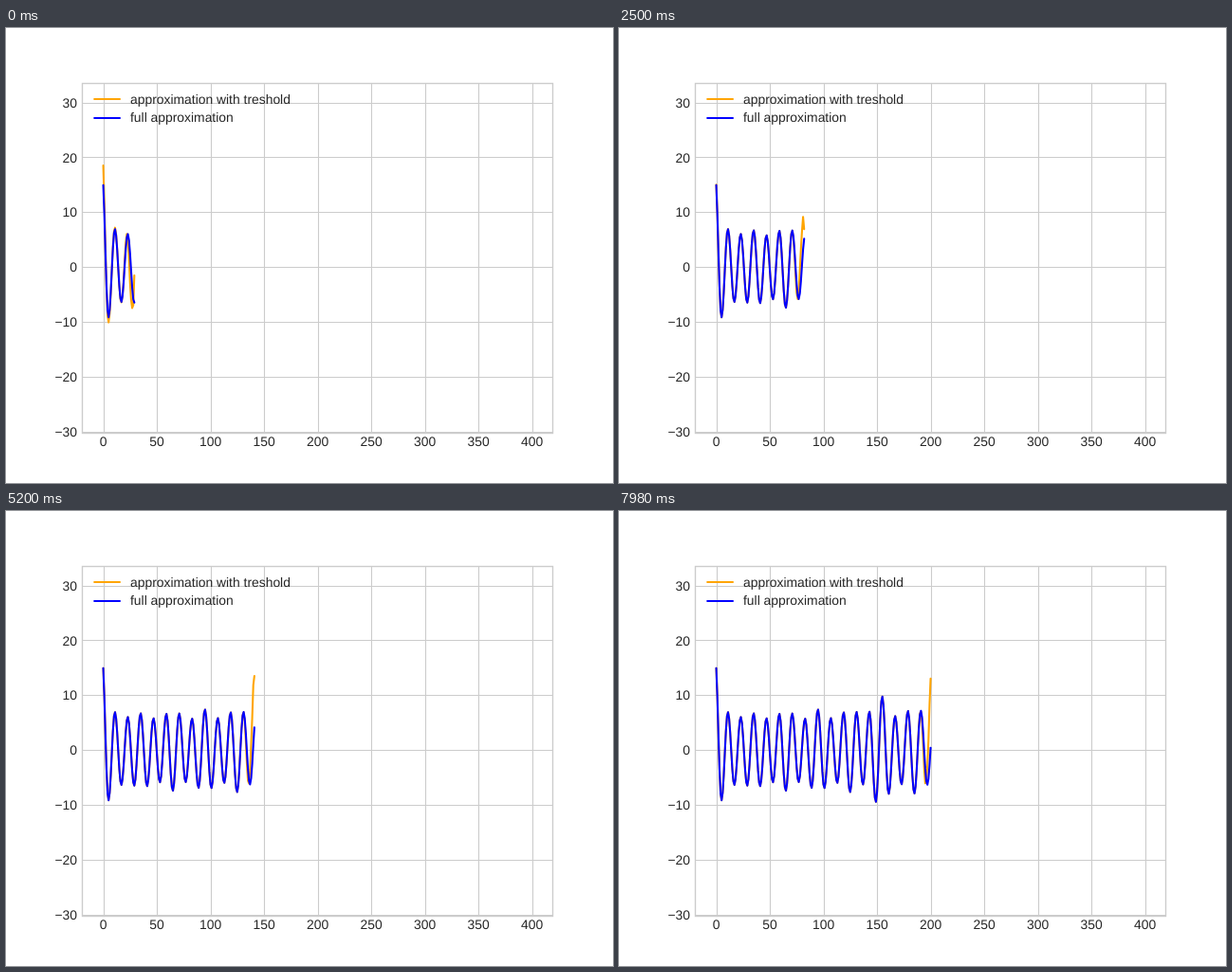
Recreate the animation shown at these times as an HTML page. Size 640 px wide and 480 px high, loop 8000 ms.

```html
<!DOCTYPE html>
<html lang="en">
<head>
<meta charset="utf-8">
<title>Signal approximation</title>
<style>
  html, body { margin: 0; width: 100%; height: 100%; overflow: hidden; background: #fff; }
  svg { display: block; width: 100%; height: 100%; }
  text {
    font: 13.89px "Liberation Sans", Arial, sans-serif;
    fill: #262626;
    text-rendering: geometricPrecision;
  }
  .grid { stroke: #ccc; stroke-width: 1.11; }
  .frame { fill: none; stroke: #ccc; stroke-width: 1.39; }
  .curve { fill: none; stroke-width: 2.08; stroke-linecap: round; stroke-linejoin: round; }
  .partial { stroke: orange; }
  .full { stroke: blue; }
</style>
</head>
<body>
<svg viewBox="0 0 640 480">
  <g id="axes"></g>
  <path id="partial" class="curve partial"/>
  <path id="full" class="curve full"/>
  <rect class="frame" x="80.5" y="58.5" width="496" height="369"/>
  <path class="curve partial" d="M93.2 75H120"/>
  <path class="curve full" d="M93.2 95H120"/>
  <text x="131" y="80">approximation with treshold</text>
  <text x="131" y="99.3">full approximation</text>
</svg>
<script>
const LOOP = 8000;
const FIRST = 29;
const HALF_WAVE = 6;
const px = x => 102.55 + 1.13 * x;
const py = y => 252.6 - 5.785 * y;
const $ = id => document.getElementById(id);
const bell = (x, width) => Math.exp(-((x / width) ** 2));

// Height of the k-th turning point: even ones are troughs, odd ones peaks.
function turn(k) {
  const base = 6.2 + 0.025 * k;
  const beat = 0.9 * Math.min(1, k / 10) * Math.cos(2 * Math.PI * k / 5);
  const onset = 2.9 * Math.exp(-1.35 * k);
  const surge = 2.5 * bell(k - 24.4, 1.5);
  return (k % 2 ? 1 : -1) * (base + beat + onset + surge);
}

function full(x) {
  const phase = (x - 4.85) / HALF_WAVE;
  const k = Math.floor(phase);
  const ease = (1 - Math.cos(Math.PI * (phase - k))) / 2;
  return turn(k) + (turn(k + 1) - turn(k)) * ease;
}

// The thresholded curve runs ahead and overshoots near its newest end.
function partial(x, last) {
  const age = last - x;
  const lead = 2.6 * bell(age, 6);
  const gain = 1 + 1.1 * bell(age, 1.5);
  const start = 1 + 0.24 * Math.exp((FIRST - last) / 14 - x / 6);
  return full(x + lead) * gain * start;
}

function trace(last, value) {
  const points = [];
  for (let i = 0; i <= last; i++) {
    points.push(px(i).toFixed(2) + " " + py(value(i, last)).toFixed(2));
  }
  return "M" + points.join("L");
}

function buildAxes() {
  let out = "";
  for (let x = 0; x <= 400; x += 50) {
    out += `<path class="grid" d="M${Math.round(px(x)) + 0.5} 58V427"/>
      <text x="${px(x)}" y="441" text-anchor="middle">${x}</text>`;
  }
  for (let y = -30; y <= 30; y += 10) {
    const label = String(y).replace("-", "\u2212");
    out += `<path class="grid" d="M80 ${Math.floor(py(y)) + 0.5}H576"/>
      <text x="75" y="${py(y) + 4.6}" text-anchor="end">${label}</text>`;
  }
  $("axes").innerHTML = out;
}

// Three samples per 140 ms, with holds of 20, 100 and 20 ms.
function lastSample(t) {
  const rest = t % 140;
  return FIRST + 3 * Math.floor(t / 140) + (rest >= 20) + (rest >= 120);
}

function draw(now) {
  const last = lastSample(now % LOOP);
  $("partial").setAttribute("d", trace(last, partial));
  $("full").setAttribute("d", trace(last, full));
}

buildAxes();
const began = performance.now();
function tick() {
  draw(performance.now() - began);
  requestAnimationFrame(tick);
}
tick();
</script>
</body>
</html>
```
